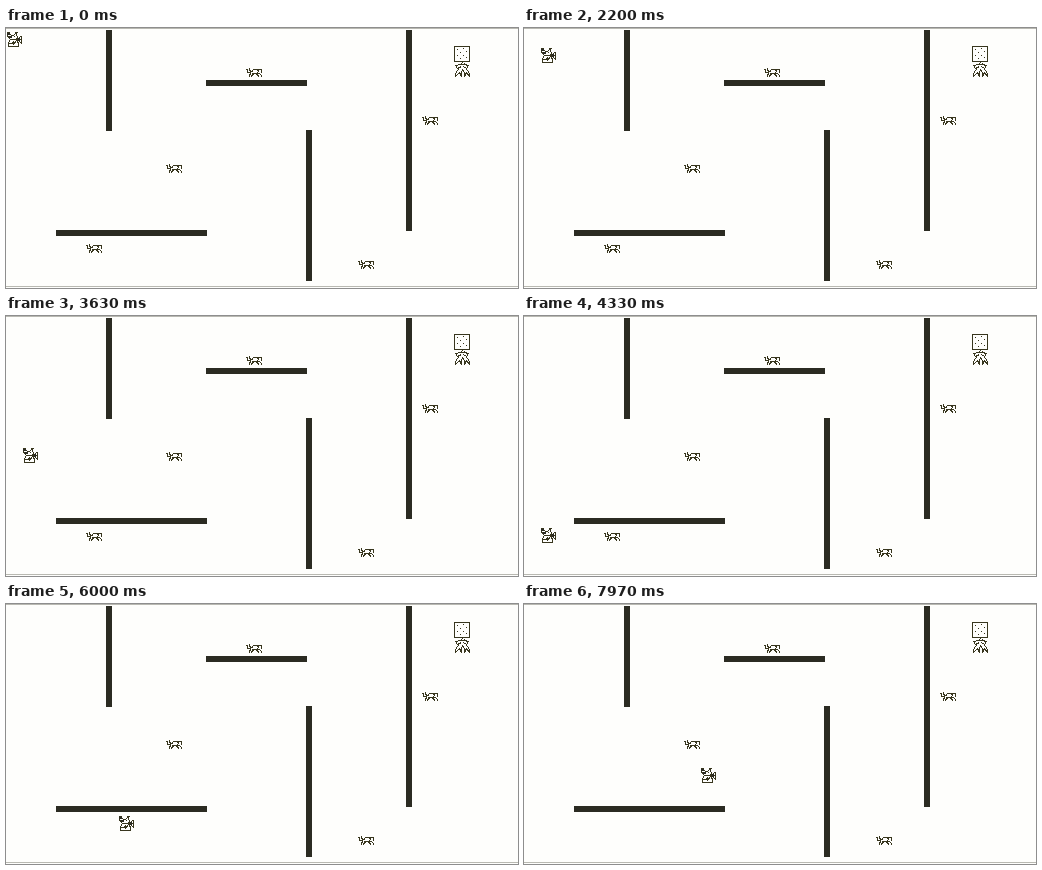
Write an HTML page that moves like this. It is 512x260 px and loops after 8000 ms.

```html
<!DOCTYPE html>
<html lang="en">
<head>
<meta charset="utf-8">
<title>Maze chase</title>
<style>
  html, body { margin: 0; width: 100%; height: 100%; overflow: hidden; background: #fefefc; }
  svg { display: block; width: 512px; height: 260px; shape-rendering: crispEdges; }
  .ink { fill: none; stroke: #38361e; stroke-width: 1; }
  .solid { fill: #2b2b22; stroke: none; }
  .edge { fill: #b9b9b2; }
</style>
</head>
<body>
<svg viewBox="0 0 512 260">
  <defs>
    <g id="spider" class="ink">
      <path d="M0 5.500h2M1.500 6v2.500h3M3.500 4v2l2 2M5.500 8.500l2-3h4l1 2"/>
      <path d="M12 6.500l1-1h2.500v3M12.500 7.500l-2 2h-5M11 9.500h3"/>
      <path d="M5.500 9.500l-2 1v2M7.500 10l-2 2v1M10.500 10l2 2v1M13.500 9.500l2 2v1"/>
    </g>
    <g id="player" class="ink">
      <path d="M1 .5h2l2 2.500h3l2-2.500h2M1.500 2v2h3M2 5.500l3 2h5l2-3M5.500 4v2M8.500 4v1M10.500 1v3"/>
      <path d="M4.500 7.500l-2 3v3.500h10v-3l-3-4M3 11.500h3l2-2M7 12.500l3-3"/>
      <path d="M10 7.500h5M11 7.500l4-3v6z"/>
      <path class="solid" d="M1 1h3v2h-3zM3 4h3v2h-3zM12 6h2v3h-2z"/>
    </g>
    <g id="goal" class="ink">
      <path d="M.5 .5h15v15h-15z"/>
      <path d="M3 3.500h1M9 2.500h1M12 5.500h1M6 6.500h1M3 9.500h1M9 9.500h1M12 11.500h1M6 12.500h1"/>
      <path d="M9.500 15.500l-3 3h4v-2M6.500 18.500l-5 1l2 3l4-2M10.500 18.500l4 1l-2 3l-3-2"/>
      <path d="M5.500 21.500l-4 6v3l4-4l2 4v-4l1-3l2 3v4l2-4l3 4v-3l-4-6"/>
    </g>
  </defs>
  <rect width="512" height="260" fill="#fefefc"/>
  <rect class="edge" width="512" height="1"/>
  <rect class="edge" y="258" width="512" height="1"/>
  <path class="solid" d="M100 2h6v101h-6zM400 2h6v201h-6zM200 52h101v6h-101zM300 102h6v151h-6zM50 202h151v6h-151z"/>
  <use href="#goal" x="448" y="18"/>
  <use href="#spider" x="240" y="36"/>
  <use href="#spider" x="416" y="84"/>
  <use href="#spider" x="160" y="132"/>
  <use href="#spider" x="352" y="228"/>
  <use href="#spider" x="80" y="212" id="prey"/>
  <use href="#player" id="hero"/>
</svg>
<script>
  const LOOP = 8000, CELL = 16, TOP = 4, CAUGHT = 5660;
  const hero = document.getElementById('hero');
  const prey = document.getElementById('prey');

  // Each run: direction, then the times of its one-cell moves.
  const runs = [
    ['R', 1970],
    ['D', 2170, 2370, 2530, 2700, 2870, 3100, 3330, 3500, 3670, 3830, 4000, 4170, 4330, 4500],
    ['R', 4830, 5070, 5230, 5430],
    ['U', CAUGHT],
    ['R', 5830, 6000, 6170, 6330, 6500, 6830, 7000, 7170],
    ['U', 7330, 7500, 7670],
    ['L', 7830, 7970]
  ];
  const dirs = { R: [1, 0], L: [-1, 0], U: [0, -1], D: [0, 1] };
  const moves = runs.flatMap(([d, ...times]) => times.map(t => [t, ...dirs[d]]));

  function draw(t) {
    let col = 0, row = 0;
    for (const [at, dx, dy] of moves) {
      if (at > t) break;
      col += dx;
      row += dy;
    }
    hero.setAttribute('x', col * CELL);
    hero.setAttribute('y', TOP + row * CELL);
    prey.setAttribute('visibility', t < CAUGHT ? 'visible' : 'hidden');
  }

  const start = performance.now();
  function tick() {
    draw((performance.now() - start) % LOOP);
    requestAnimationFrame(tick);
  }
  draw(0);
  requestAnimationFrame(tick);
</script>
</body>
</html>
```
